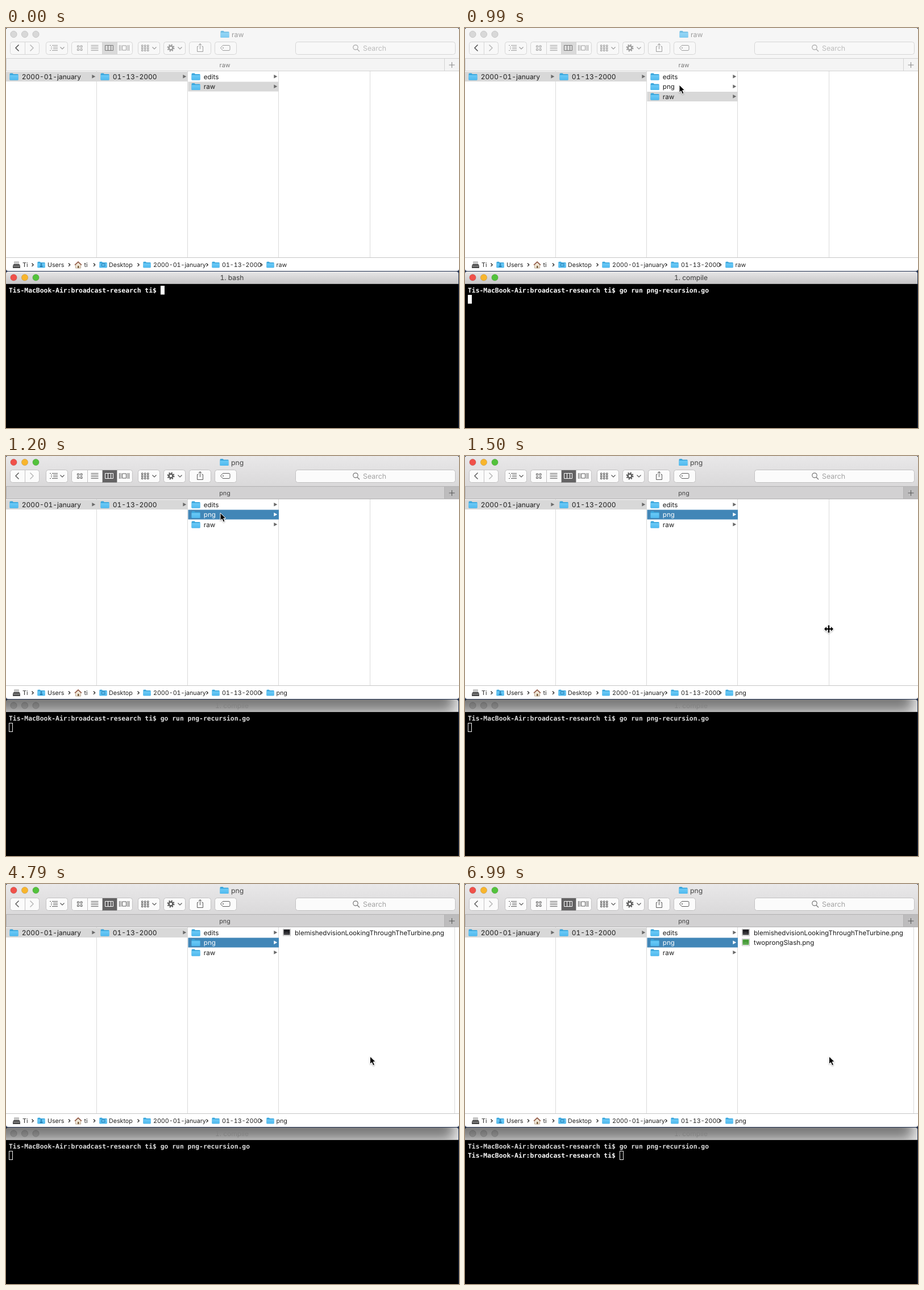
These frames come from a looping animation (797 by 703 pixels, 7.09 s). An HTML page:

```html
<!DOCTYPE html>
<html lang="en">
<head>
<meta charset="utf-8">
<title>File browser and terminal</title>
<style>
  html, body { margin: 0; width: 100%; height: 100%; overflow: hidden; background: #1c2c4c; }
  svg { display: block; width: 797px; height: 703px; }
  text {
    font-family: Inter, "Open Sans", sans-serif;
    font-variant-numeric: tabular-nums;
    text-rendering: geometricPrecision;
    white-space: pre;
  }
  .mono { font: bold 11.37px "DejaVu Sans Mono", monospace; }
</style>
</head>
<body>
<svg id="stage" viewBox="0 0 797 703">
  <defs>
    <linearGradient id="toolbar" x2="0" y2="1"><stop stop-color="#e9e8e9"/><stop offset="1" stop-color="#d3d2d3"/></linearGradient>
    <linearGradient id="titlebar" x2="0" y2="1"><stop stop-color="#e8e7e8"/><stop offset="1" stop-color="#c6c5c6"/></linearGradient>
    <linearGradient id="folderFill" x2="0" y2="1"><stop stop-color="#6bcaf7"/><stop offset="1" stop-color="#4fb9ee"/></linearGradient>
    <filter id="soft" x="-20%" y="-50%" width="140%" height="200%"><feGaussianBlur stdDeviation="12"/></filter>
    <filter id="drop" x="-50%" y="-50%" width="200%" height="200%"><feDropShadow dx="0" dy="1" stdDeviation="1" flood-opacity=".35"/></filter>
    <clipPath id="barClip"><rect y="428" width="796" height="22"/></clipPath>
  </defs>
  <g id="scene"></g>
</svg>
<script>
const LOOP = 7090;
const PROMPT = "Tis-MacBook-Air:broadcast-research ti$ ";
const COMMAND = "go run png-recursion.go ";
const CHAR = 6.845;

// Hard-cut timelines: [start in ms, value]
const typed = [[0, 0], [100, 3], [200, 8], [300, 24]];
const pointer = [
  [0, null], [700, ["arrow", 313, 447]], [890, ["arrow", 365, 190]], [990, ["arrow", 377, 100]],
  [1300, ["arrow", 452, 182]], [1400, ["arrow", 585, 284]], [1500, ["resize", 640, 304]],
  [4790, ["arrow", 640.5, 303]]
];
const at = (track, t) => track.filter(([start]) => t >= start).pop()[1];

const rect = (x, y, w, h, fill, extra = "") =>
  `<rect x="${x}" y="${y}" width="${w}" height="${h}" fill="${fill}" ${extra}/>`;
const path = (d, fill, extra = "") => `<path d="${d}" fill="${fill}" ${extra}/>`;
const stroke = (d, color, width = 1) =>
  path(d, "none", `stroke="${color}" stroke-width="${width}"`);
const text = (x, y, s, size = 11.6, color = "#1c1c1c", extra = "") =>
  `<text x="${x}" y="${y}" font-size="${size}" fill="${color}" ${extra}>${s}</text>`;
const mono = (y, s, color) => `<text class="mono" x="5" y="${y}" fill="${color}">${s}</text>`;

const folder = (x, y, w = 16) => `<g transform="translate(${x} ${y}) scale(${w / 16})">
  ${path("M.5 2Q.5 .5 2 .5H5.5L7 2H14.5Q15.5 2 15.5 3V11.5Q15.5 12.5 14.5 12.5H1.5Q.5 12.5 .5 11.5Z", "#3aa6dc")}
  ${path("M.5 3.8H15.5V11.5Q15.5 12.5 14.5 12.5H1.5Q.5 12.5 .5 11.5Z", "url(#folderFill)")}</g>`;

const lights = (y, active) => ["#f0514a", "#f8b52d", "#53c23c"].map((color, i) =>
  `<circle cx="${13.5 + 19.5 * i}" cy="${y}" r="5.7" fill="${active ? color : "#000"}"
    fill-opacity="${active ? 1 : .12}" stroke="#000" stroke-opacity=".13"/>`).join("");

function toolbar(active) {
  const ink = active ? "#5a5a5a" : "#9c9c9c";
  const edge = active ? "#c2c1c2" : "#d6d6d6";
  const face = active ? "#fbfbfb" : "#f8f8f8";
  const button = (x, w) => rect(x + .5, 24.5, w, 22, face, `rx="4" stroke="${edge}"`);
  const drop = x => stroke(`M${x - 3.5} 33.5l3.5 3.5l3.5-3.5`, ink, 1.2);
  const squares = (x, y, cols, rows, size, stepX, stepY) => {
    let d = "";
    for (let i = 0; i < cols * rows; i++)
      d += `M${x + i % cols * stepX} ${y + Math.floor(i / cols) * stepY}h${size}v${size}h-${size}z`;
    return stroke(d, ink, 1);
  };
  const teeth = `<circle cx="290" cy="35" r="5.2" fill="none" stroke="${ink}" stroke-width="2.6" stroke-dasharray="2.04"/>`;
  return [
    button(7, 51), button(70, 38), button(115, 107), button(232, 38),
    button(277, 38), button(322, 38), button(367, 38), button(509, 281),
    rect(169, 25, 26, 21.5, active ? "#636263" : "#dadada"),
    stroke("M33.5 25V46M143.5 25V46M169.5 25V46M195.5 25V46", edge),
    stroke("M22.5 29.5L17 35L22.5 40.5", active ? "#606060" : "#505050", 1.5),
    stroke("M42.5 29.5L48 35L42.5 40.5", "#b9b9b9", 1.5),
    stroke("M77 30.5h2M81 30.5h10M79 33.5h2M83 33.5h8M79 36.5h2M83 36.5h8M77 39.5h2M81 39.5h10", ink), drop(99),
    squares(125.5, 31, 2, 2, 3, 5.5, 5.5),
    stroke("M149.5 30.5h13M149.5 33.5h13M149.5 36.5h13M149.5 39.5h13", ink),
    stroke("M174.5 30.5h14v9h-14zM179.5 30.5v9M184.5 30.5v9", active ? "#fff" : "#777"),
    stroke("M199.5 30v10M202 30v10M214 30v10M216.5 30v10M204.5 31h7v8h-7z", ink),
    squares(238.5, 30, 3, 3, 2.5, 5, 4), drop(261),
    teeth, `<circle cx="290" cy="35" r="3.4" fill="none" stroke="${ink}" stroke-width="2.4"/>`, drop(306),
    stroke("M338.5 32.5H336.5V41.5H346.5V32.5H344.5M341.5 37V27.5M338.5 30.5l3-3l3 3", ink),
    stroke("M377.5 35L381.5 30.5H392Q394 30.5 394 32.5V37.5Q394 39.5 392 39.5H381.5Z", ink),
    `<circle cx="382" cy="35" r="1" fill="${ink}"/>`,
    `<circle cx="615" cy="34" r="4.2" fill="none" stroke="${active ? "#777" : "#aaa"}" stroke-width="1.2"/>`,
    stroke("M618 37.2l4 4", active ? "#777" : "#aaa", 1.3),
    text(628, 39.7, "Search", 12.4, active ? "#a3a3a3" : "#bdbdbd")
  ].join("");
}

function row(column, index, name, highlight) {
  const x = [0, 160, 320][column], y = 77 + 17.5 * index;
  const blue = highlight === "blue", fill = blue ? "#4186b7" : "#d8d8d8";
  return (highlight ? rect(x + (column === 2 ? .5 : 0), y, column === 2 ? 159.5 : 159, 17, fill) : "") +
    folder(x + 6, y + 2) +
    text(x + 27.8, y + 12.8, name, column === 2 ? 11.6 : 12, blue ? "#fff" : "#1c1c1c") +
    path(`M${x + 151.3} ${y + 5}l6 3.3l-6 3.3z`, blue ? "#fff" : "#6b6b6b");
}

function file(index, name, icon) {
  const y = 78 + 17.5 * index;
  const image = icon === "page"
    ? path(`M489.5 ${y + .5}h6.5l3 3v10h-9.5z`, "#fff", 'stroke="#b5b5b5"') +
      path(`M496 ${y + .5}v3h3`, "none", 'stroke="#b5b5b5"') +
      rect(491, y + 6, 6, 3, "#6f879b") + rect(491, y + 10, 6, 1.5, "#888")
    : rect(487.5, y + 1, 13, 12, "#fff", 'stroke="#c4c4c4"') + rect(488.5, y + 2, 11, 9.5, icon) +
      path(`M488.5 ${y + 11.5}v-3l5-2l6 2v3z`, "#fff", 'opacity=".13"');
  return image + text(508, y + 11.8, name);
}

function pathBar(selected) {
  const label = (x, s) => text(x, 420, s, 10.7, "#222");
  const disk = rect(14, 410, 9, 6, "#c6c6c6", 'rx="1"') + path("M13.5 415h10l1.5 3v4h-13v-4z", "#4c4c4c") +
    rect(13, 418, 11, 1, "#aaa");
  const house = path("M122.5 416v6h9v-6l-4.5-4z", "#efe5d4", 'stroke="#a58d72" stroke-width=".7"') +
    stroke("M121 416.5l6-5.5l6 5.5", "#8d4f3c", 1.4) + rect(126, 418, 2.5, 4, "#7d6040");
  const chevrons = [47, 111.5, 155.5, 233, 354, 449.5]
    .map(x => stroke(`M${x - 1.5} 413.5l2.7 2.7l-2.7 2.7`, "#222", 1.3)).join("");
  return disk + house + chevrons +
    [55, 164, 241, 362, 458].map(x => folder(x, 410.3, 14)).join("") +
    `<circle cx="62" cy="415" r="1.5" fill="#287db0"/>` + path("M59.5 420q0-3 2.5-3t2.5 3z", "#287db0") +
    stroke("M168 414.5h6v4h-6z", "#287db0") +
    label(29, "Ti") + label(73, "Users") + label(137.5, "ti") + label(181, "Desktop") +
    label(259, "2000-01-january") + label(380, "01-13-2000") + label(475.5, selected);
}

function browser(t, active) {
  const hasPng = t >= 600, selected = t >= 1200 ? "png" : "raw";
  const highlight = active ? "blue" : "gray";
  const names = hasPng ? ["edits", "png", "raw"] : ["edits", "raw"];
  const line = active ? "#b2b1b2" : "#d2d2d2";
  const titleX = selected === "png" ? 376 : 377;
  const wide = t >= 4790;
  let out = rect(0, 0, 797, 427, "#fff", 'rx="4"') +
    path("M0 76V4Q0 0 4 0H793Q797 0 797 4V76Z", active ? "url(#toolbar)" : "#f6f6f6") +
    rect(0, 53, 797, 23, active ? "#d2d1d2" : "#f4f4f4") +
    (active ? rect(771, 53, 26, 23, "#bdbcbd") : "") +
    stroke("M0 53.5H797M0 75.5H797M771.5 53V76M.5 53V76", line) +
    stroke("M779.5 65h10M784.5 60v10", active ? "#555" : "#888") +
    lights(11, active) +
    `<g opacity="${active ? 1 : .7}">${folder(titleX, 4.5)}</g>` +
    text(titleX + 20, 15.6, selected, 12.2, active ? "#444" : "#9c9c9c") +
    text(385, 68.7, selected, 10.7, active ? "#444" : "#777", 'text-anchor="middle"') +
    toolbar(active) +
    stroke(`M159.5 76V403M319.5 76V403M479.5 76V403M${wide ? 789.5 : 640.5} 76V403`, "#dadada") +
    row(0, 0, "2000-01-january", "gray") + row(1, 0, "01-13-2000", "gray") +
    names.map((name, i) => row(2, i, name, name === selected && highlight)).join("");
  if (t >= 4200)
    out += file(0, wide ? "blemishedvisionLookingThroughTheTurbine.png" : "blemishe…rbine.png", t >= 4400 ? "#202024" : "page");
  if (t >= 6790) out += file(1, "twoprongSlash.png", t >= 6990 ? "#449a35" : "page");
  return out + stroke("M0 403.5H797", "#c6c6c6") + pathBar(selected);
}

function terminal(t, active) {
  const entered = t >= 400, done = t >= 6790;
  const input = COMMAND.slice(0, at(typed, t));
  const column = done ? PROMPT.length : entered ? 0 : PROMPT.length + input.length;
  const x = 5 + column * CHAR, y = entered ? 469 : 453;
  return path("M0 450V432Q0 428 4 428H792Q796 428 796 432V450Z", active ? "url(#titlebar)" : "#f2f2f2") +
    (active ? "" : `<g clip-path="url(#barClip)">${rect(-60, 370, 848, 80, "#000", 'opacity=".5" filter="url(#soft)"')}</g>`) +
    rect(0, 450, 796, 253, "#000") + stroke("M0 449.5H796", active ? "#a8a8a8" : "#b0b0b0") +
    lights(438.5, active) +
    text(397.5, 443, t >= 700 ? "1. compile" : "1. bash", 12, active ? "#383838" : "#828282", 'text-anchor="middle"') +
    mono(465, PROMPT + input, active ? "#fff" : "#dedede") +
    (done ? mono(481, PROMPT, "#fff") : "") +
    (active ? rect(x, y, 7, 15.5, "#fff") : rect(x + .5, y + .5, 6, 15, "none", 'stroke="#eee"'));
}

function drawPointer(spot) {
  if (!spot) return "";
  const [kind, x, y] = spot;
  const shape = kind === "arrow"
    ? path("M0 0V13.5L3.1 10.6L5.4 16L8 14.9L5.7 9.6H9.8Z", "#000", 'stroke="#fff" stroke-width="1"')
    : path("M-8 0L-4-4V-1.2H-1.2V-6.5H1.2V-1.2H4V-4L8 0L4 4V1.2H1.2V6.5H-1.2V1.2H-4V4Z", "#000",
        'stroke="#fff" stroke-width="1.6" paint-order="stroke"');
  return `<g transform="translate(${x} ${y})" filter="url(#drop)">${shape}</g>`;
}

const scene = document.getElementById("scene");
let shown = "";
function frame() {
  const t = performance.now() % LOOP;
  const browserActive = t >= 1090;
  const markup = terminal(t, !browserActive) + browser(t, browserActive) + drawPointer(at(pointer, t));
  if (markup !== shown) scene.innerHTML = shown = markup;
  requestAnimationFrame(frame);
}
frame();
</script>
</body>
</html>
```
